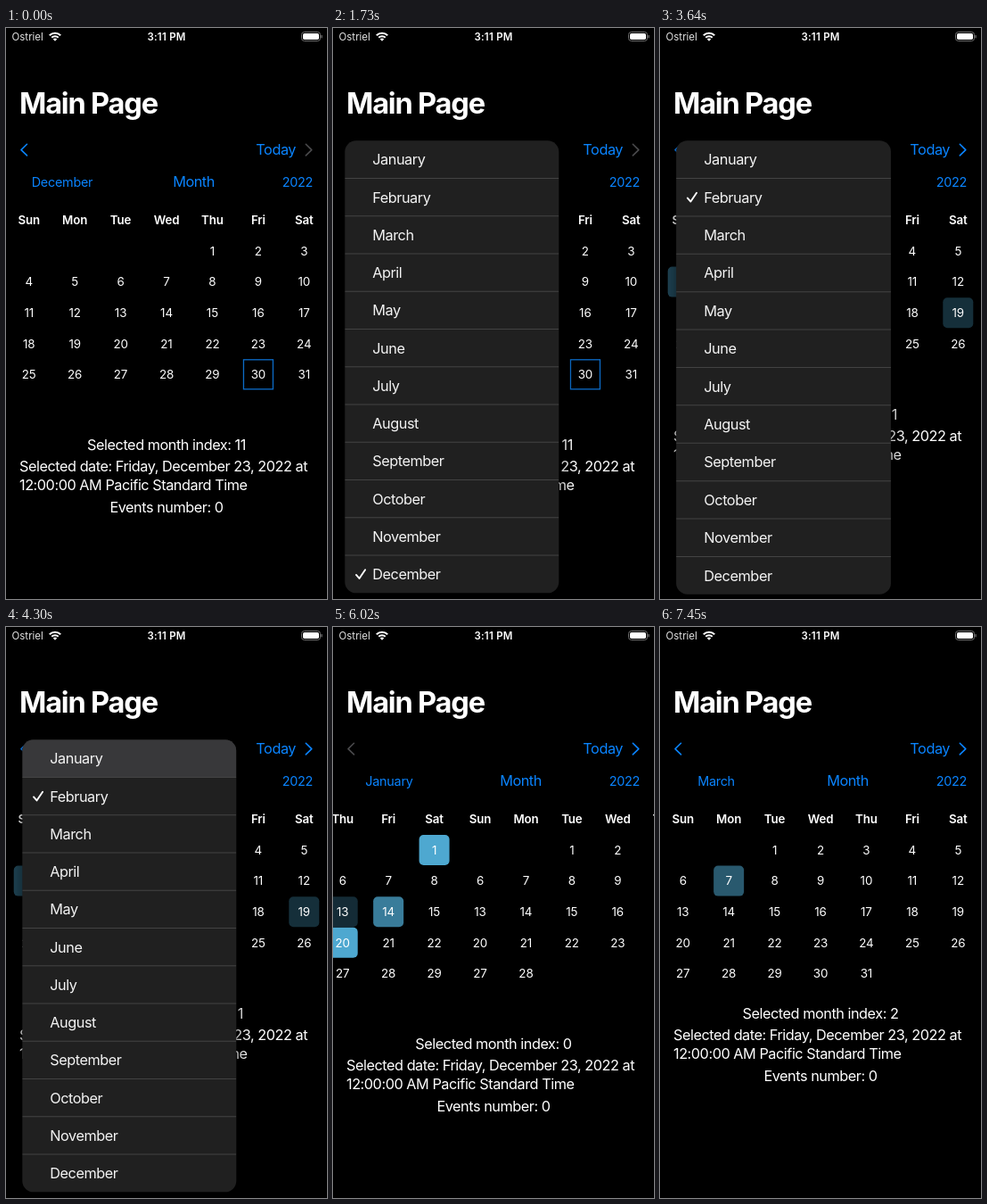
These frames come from a looping animation (360x640 px, 8 s). An HTML page with a canvas:

```html
<!DOCTYPE html>
<html lang="en">
<head>
<meta charset="utf-8">
<title>Calendar</title>
<style>
  html, body { margin: 0; width: 100%; height: 100%; overflow: hidden; background: #000; }
  canvas { display: block; width: 360px; height: 640px; }
</style>
</head>
<body>
<canvas id="stage"></canvas>
<script>
const W = 360, H = 640, LOOP = 8000;
const canvas = document.getElementById('stage');
const ratio = window.devicePixelRatio || 1;
canvas.width = W * ratio;
canvas.height = H * ratio;
const ctx = canvas.getContext('2d');

const BLUE = '#0a84ff', GRAY = '#4a4a4c', WHITE = '#fff';
const MONTHS = ['January', 'February', 'March', 'April', 'May', 'June', 'July',
  'August', 'September', 'October', 'November', 'December'];
const DAYS = ['Sun', 'Mon', 'Tue', 'Wed', 'Thu', 'Fri', 'Sat'];
const COL = W / 7, ROW = 34.6;

// Highlight strength of days with events, by month and day
const EVENTS = {
  0: { 1: 1, 13: 0.26, 14: 0.74, 20: 1 },
  1: { 6: 0.42, 19: 0.28 },
  2: { 7: 0.53 }
};

const STYLES = {
  title: { size: 32.6, weight: 700, track: -0.037 },
  body: { size: 16.3, weight: 400, track: -0.029 },
  label: { size: 14.4, weight: 400, track: -0.018 },
  week: { size: 13.3, weight: 600, track: -0.01 },
  day: { size: 13.4, weight: 400, track: -0.01 },
  status: { size: 11.5, weight: 400, track: 0 },
  clock: { size: 11.5, weight: 600, track: 0.02 }
};

// The screen refreshes in short bursts, on 10 ms steps, and rests between them
const burst = (from, to, n) =>
  Array.from({ length: n }, (_, i) => Math.floor((from + (to - from) * i / (n - 1)) / 10) * 10);
const TICKS = [0, ...burst(1180, 1730, 6), ...burst(2340, 2870, 6), ...burst(3270, 3870, 6),
  ...burst(4300, 4730, 5), 5860, ...burst(6020, 6460, 5), 6870, ...burst(7030, 7450, 5)];

const MENUS = [
  { open: 1180, tap: 2340, from: 11, to: 1 },
  { open: 3270, tap: 4300, from: 1, to: 0 }
];
const TAP_DELAY = 54.5;
const SWIPES = [
  { start: 5860, from: 0, drag: 50 },
  { start: 6870, from: 1, drag: 64 }
];
const SWITCH_DELAY = 290;

const clamp = v => Math.max(0, Math.min(1, v));
const mix = (a, b, p) => a + (b - a) * p;
const ease = v => {
  const p = clamp(v);
  return p < 0.5 ? 2 * p * p : 1 - 2 * (1 - p) ** 2;
};
const spring = x => 1 - Math.exp(-x) * (Math.cos(0.6 * x) + Math.sin(0.6 * x) / 0.6);

function scrollAt(t) {
  let pos = 11;
  for (const m of MENUS) {
    if (t >= m.tap) pos = mix(m.from, m.to, ease((t - m.tap - TAP_DELAY) / 300));
  }
  for (const s of SWIPES) {
    if (t < s.start) continue;
    const held = s.drag / W, free = t - s.start - 160;
    if (free < 0) pos = s.from + held;
    else pos = s.from + (free > 300 ? 1 : 1 - (1 - held) * Math.exp(-(free + 60) / 75));
  }
  return pos;
}

function selectedAt(t) {
  let month = 11;
  for (const m of MENUS) if (t >= m.tap + TAP_DELAY) month = m.to;
  for (const s of SWIPES) if (t >= s.start + SWITCH_DELAY) month = s.from + 1;
  return month;
}

// How far the lower text has moved up for a five-row month
function liftAt(t) {
  const move = start => ease((t - start) / 300);
  const [a, b] = MENUS;
  return 34 * (move(a.tap + TAP_DELAY) - move(b.tap + TAP_DELAY) +
    move(SWIPES[0].start + SWITCH_DELAY));
}

function text(str, x, y, style, color = WHITE, align = 'left') {
  const s = STYLES[style];
  ctx.font = `${s.weight} ${s.size}px Inter, "Liberation Sans", sans-serif`;
  ctx.letterSpacing = `${s.size * s.track}px`;
  ctx.textAlign = align;
  ctx.fillStyle = color;
  ctx.fillText(str, x, y + s.size * 0.364);
}

function box(x, y, w, h, r, color) {
  ctx.beginPath();
  ctx.roundRect(x, y, w, h, r);
  ctx.fillStyle = color;
  ctx.fill();
}

function line(points, color, width) {
  ctx.beginPath();
  points.forEach(([x, y]) => ctx.lineTo(x, y));
  ctx.strokeStyle = color;
  ctx.lineWidth = width;
  ctx.lineCap = ctx.lineJoin = 'round';
  ctx.stroke();
}

function statusBar() {
  text('Ostriel', 6.5, 10, 'status', '#e4e4e4');
  text('3:11 PM', 180, 10, 'clock', WHITE, 'center');
  ctx.lineCap = 'butt';
  ctx.strokeStyle = WHITE;
  ctx.lineWidth = 2;
  for (const r of [5.3, 8.8]) {
    ctx.beginPath();
    ctx.arc(55, 14.5, r, -Math.PI * 0.75, -Math.PI * 0.25);
    ctx.stroke();
  }
  ctx.beginPath();
  ctx.moveTo(55, 14.8);
  ctx.arc(55, 14.8, 3.2, -Math.PI * 0.75, -Math.PI * 0.25);
  ctx.fillStyle = WHITE;
  ctx.fill();

  ctx.beginPath();
  ctx.roundRect(331.5, 4.5, 21, 10, 3);
  ctx.strokeStyle = '#707070';
  ctx.lineWidth = 1;
  ctx.stroke();
  box(333, 6, 18, 7, 1.8, WHITE);
  box(353.4, 8, 1.3, 3.4, 0.6, '#707070');
}

function controls(month, labelAlpha) {
  line([[23.5, 130.3], [17, 136.6], [23.5, 142.9]], month > 0 ? BLUE : GRAY, 1.6);
  line([[336.3, 130.3], [342.8, 136.6], [336.3, 142.9]], month < 11 ? BLUE : GRAY, 1.6);
  text('Today', 325, 136.5, 'body', BLUE, 'right');
  ctx.globalAlpha = labelAlpha;
  text(MONTHS[month], 63, 173, 'label', BLUE, 'center');
  ctx.globalAlpha = 1;
  text('Month', 210.5, 172.5, 'body', BLUE, 'center');
  text('2022', 344, 173, 'label', BLUE, 'right');
}

function monthPage(month, left, marks) {
  const first = new Date(2022, month, 1).getDay();
  const count = new Date(2022, month + 1, 0).getDate();
  DAYS.forEach((d, i) => text(d, left + COL * (i + 0.5), 215.5, 'week', WHITE, 'center'));
  for (let day = 1; day <= count; day++) {
    const cell = first + day - 1;
    const x = left + COL * (cell % 7 + 0.5);
    const y = 250 + ROW * Math.floor(cell / 7);
    if (marks[day]) box(x - 17, y - 17, 34, 34, 5, `rgba(78,168,208,${marks[day]})`);
    if (month === 11 && day === 30) {
      ctx.strokeStyle = '#0c6cc8';
      ctx.lineWidth = 1.3;
      ctx.lineJoin = 'miter';
      ctx.strokeRect(x - 16.4, y - 16.6, 33, 33);
    }
    text(String(day), x, y, 'day', WHITE, 'center');
  }
}

// Only the selected month has its events loaded
function calendar(pos, selected) {
  for (let m = Math.floor(pos); m <= Math.ceil(pos); m++) {
    monthPage(m, (m - pos) * W, m === selected && EVENTS[m] || {});
  }
}

function summary(month, lift) {
  const top = month === 11 || month === 0 ? 467 : 433;
  text(`Selected month index: ${month}`, 180, top, 'body', WHITE, 'center');
  text('Selected date: Friday, December 23, 2022 at', 15, 491.5 - lift, 'body');
  text('12:00:00 AM Pacific Standard Time', 15, 512.5 - lift, 'body');
  text('Events number: 0', 180, 537 - lift, 'body', WHITE, 'center');
}

// Openness of a menu and opacity of the button label behind it
function menuState(menu, t) {
  if (t < menu.open) return { size: 0, label: 1 };
  const closing = t - menu.tap - TAP_DELAY;
  if (closing >= 0) {
    return { size: 1 - ease(closing / 200), label: clamp((closing - 100) / 250) };
  }
  const opening = Math.max(0, t - menu.open - 60);
  return { size: spring(opening / 50), label: opening ? 0 : 0.4 };
}

function drawMenu(menu, size, t) {
  if (size <= 0) return;
  const left = menu.from === 11 ? 13.3 : 18.3;
  const top = 126.3, width = 240, rowH = 42.25, height = rowH * 12;
  const scale = 0.2 + 0.8 * size;
  ctx.save();
  ctx.globalAlpha = clamp(t < menu.tap ? size * 1.6 : size);
  ctx.translate(63, 173);
  ctx.scale(scale, scale);
  ctx.translate(-63, -173);

  ctx.shadowColor = 'rgba(0,0,0,0.6)';
  ctx.shadowBlur = 20 * ratio;
  box(left, top, width, height, 12.5, '#202020');
  ctx.shadowColor = 'transparent';
  ctx.clip();

  MONTHS.forEach((name, i) => {
    const y = top + rowH * i, mid = y + rowH / 2;
    if (t >= menu.tap && i === menu.to) box(left, y, width, rowH, 0, '#38383a');
    if (i) box(left, y - 0.5, width, 1, 0, '#434343');
    if (i === menu.from) {
      line([[left + 12.7, mid + 0.8], [left + 16.2, mid + 4.8], [left + 22.8, mid - 5]], WHITE, 1.9);
    }
    text(name, left + 31, mid, 'body', '#f4f4f4');
  });
  ctx.restore();
}

function draw(t) {
  ctx.setTransform(ratio, 0, 0, ratio, 0, 0);
  ctx.fillStyle = '#000';
  ctx.fillRect(0, 0, W, H);
  const month = selectedAt(t);
  const menu = t < MENUS[1].open ? MENUS[0] : MENUS[1];
  const state = menuState(menu, t);
  statusBar();
  text('Main Page', 15, 84.5, 'title');
  controls(month, state.label);
  calendar(scrollAt(t), month);
  summary(month, liftAt(t));
  drawMenu(menu, state.size, t);
}

const start = performance.now();
function frame() {
  const t = (performance.now() - start) % LOOP;
  draw(TICKS.findLast(tick => tick <= t + 0.5) || 0);
  requestAnimationFrame(frame);
}
frame();
</script>
</body>
</html>
```
